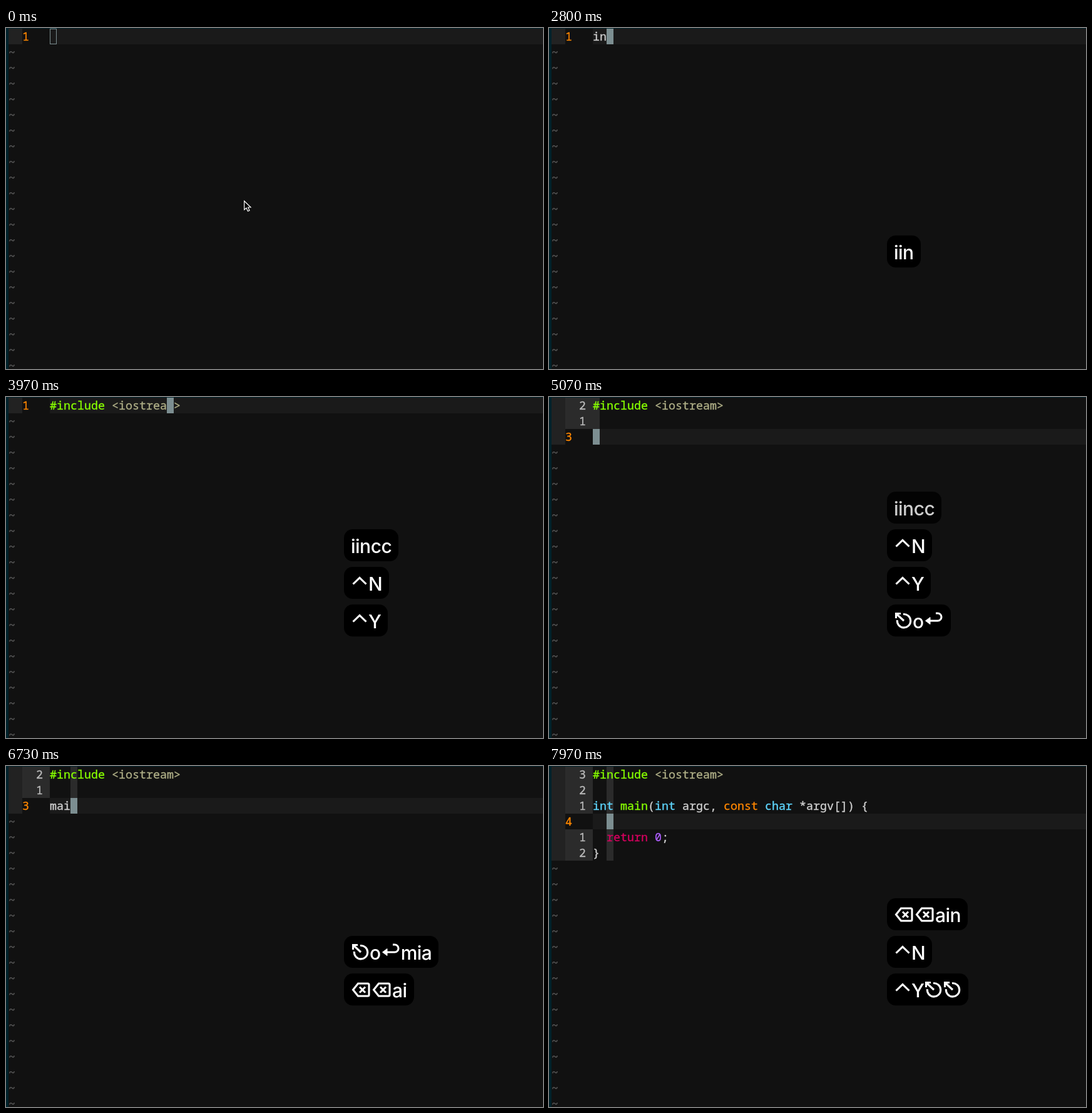
These frames come from a looping animation (858x544 px, 8000 ms). An HTML page:

```html
<!DOCTYPE html>
<html lang="en">
<head>
<meta charset="utf-8">
<title>Snippet completion in a terminal editor</title>
<style>
html, body { margin: 0; width: 100%; height: 100%; overflow: hidden; background: #111; }
#stage { position: absolute; inset: 0; overflow: hidden; background: #111; }
#stage::before { content: ""; position: absolute; inset: 0; border: solid #00222b; border-width: 1px 0 0 4px; }
#editor { position: absolute; left: 4px; top: 1px; right: 0; bottom: 0; overflow: hidden;
  font: 500 18.3333px/24px "Noto Sans Mono", monospace; color: #d0d0d0; white-space: pre;
  -webkit-text-stroke: .35px; }
#editor div { position: absolute; height: 25px; }
.sign { left: 0; width: 22px; background: #222; }
.number { left: 22px; width: 44px; background: #2b2b2b; color: #bcbcbc; }
.number.current { background: #111; color: #ff8700; }
.line { left: 66px; right: 0; }
.line.current { background: #1a1a1a; }
.column { width: 11px; background: #2b2b2b; }
.cursor { width: 11px; background: #7c8e91; }
.cursor.hollow { box-sizing: border-box; border: 1px solid #7c8e91; background: none; }
.tilde { left: 0; color: #585858; }
.menu { left: 55px; background: #000; color: #5fd7ff; }
.menu.selected { background: #6c6c6c; color: #eee; }
.green { color: #87ff00; } .sand { color: #afaf87; } .cyan { color: #5fd7ff; }
.orange { color: #ff8700; } .red { color: #d7005f; } .violet { color: #af5fff; }
.bubble { position: absolute; left: 540px; height: 51px; padding: 0 11px; border-radius: 14px; display: flex;
  background: #000; color: #fff; font: 500 30px/54px Inter, sans-serif; letter-spacing: -.5px; white-space: pre; }
.bubble svg { flex: none; fill: none; stroke: #fff; stroke-width: 3.1; }
.pointer { position: absolute; left: 0; top: 0; overflow: visible; fill: #000; stroke: #fff; stroke-width: 1.2; }
</style>
</head>
<body>
<div id="stage">
  <div id="editor"></div>
  <div id="keys"></div>
  <svg class="pointer" id="arrow" width="12" height="18"><path d="M.7 1V15L4 12L6.4 17.3L9 16.2L6.7 11H11Z"/></svg>
  <svg class="pointer" id="beam" width="9" height="18"><path d="M.7 1H3.4L4.5 2L5.6 1H8.3V3H6.2L5.5 4V8H6.5V10H5.5V14L6.2 15H8.3V17H5.6L4.5 16L3.4 17H.7V15H2.8L3.5 14V10H2.5V8H3.5V4L2.8 3H.7Z"/></svg>
</div>
<script>
const LOOP = 8000, CELL = 11, ROW = 25, ROWS = 22;
const $ = id => document.getElementById(id);
const escapeHtml = s => s.replace(/&/g, '&amp;').replace(/</g, '&lt;');
const span = (color, s) => `<span class="${color}">${escapeHtml(s)}</span>`;

const include = span('green', '#include') + ' ' + span('sand', '<iostream>');
const mainBody = [
  span('cyan', 'int') + ' ' + span('green', 'main') + '(' + span('cyan', 'int') + ' argc, ' +
    span('orange', 'const') + ' ' + span('cyan', 'char') + ' *argv[]) {',
  '',
  '  ' + span('red', 'return') + ' ' + span('violet', '0') + ';',
  '}'
];

// One editor view; `column` is the highlighted cursor column.
const view = (lines, row, col, extra) => ({ lines, row, col, column: col, ...extra });
const first = (s, extra) => view([s], 0, s.length, extra);
const third = (s, extra) => view([include, '', s], 2, s.length, extra);

const incMenu = 'incc~ S [S]', mainMenu = 'main~ S [S]';
const finished = view([include, '', ...mainBody], 3, 2);
const views = [
  [0, first('', { hollow: true })],
  [1000, first('')],
  [2600, first('i')],
  [2730, first('in')],
  [2870, first('inc')],
  [3030, first('incc')],
  [3100, first('incc', { menu: incMenu })],
  [3300, first('incc', { menu: incMenu, selected: true })],
  [3520, view([include], 0, 17)],
  [4600, view([include, ''], 1, 0)],
  [4800, third('')],
  [5170, third('m', { column: 0 })],
  [5300, third('mi', { column: 0 })],
  [5430, third('mia', { column: 0 })],
  [5530, third('mia', { column: 0, menu: 'PTHREAD_MUTEX_INITIALIZER r [LS]' })],
  [6130, third('mi')],
  [6270, third('m')],
  [6430, third('ma')],
  [6570, third('mai')],
  [6850, third('main', { column: 3 })],
  [6930, third('main', { column: 3, menu: mainMenu })],
  [7200, third('main', { column: 3, menu: mainMenu, selected: true })],
  [7400, finished]
];

// Each bubble: its keys and the time each was pressed.
const bubbles = [
  ['iincc', [2230, 2600, 2730, 2870, 3030]],
  ['⌃N', [3300, 3300]],
  ['⌃Y', [3520, 3520]],
  ['⎋o↩mia', [4430, 4600, 4800, 5170, 5300, 5430]],
  ['⌫⌫ain', [6130, 6270, 6430, 6570, 6850]],
  ['⌃N', [7200, 7200]],
  ['⌃Y⎋⎋', [7400, 7400, 7530, 7670]]
];
const HOLD = 2000, FADE = 200;

const icon = (width, path) => `<svg width="${width}" height="51">${path}</svg>`;
const icons = {
  '⌃': icon(28, '<path d="M3.5 27.5L14 17.5L24.5 27.5"/>'),
  '⎋': icon(30, '<path d="M15 15.5A10.7 10.7 0 1 1 5.4 25M16 26L4 15M3.5 22V14.5H11"/>'),
  '↩': icon(32, '<path d="M6 26H22A6 6 0 0 0 22 14H19"/><path d="M2.5 26L10 20.5V31.5Z" fill="#fff" stroke-width="1"/>'),
  '⌫': icon(33, '<path d="M3.5 26L11.5 16H27Q29 16 29 18V34Q29 36 27 36H11.5Z"/><path d="M14 21.5L23 30.5M23 21.5L14 30.5"/>')
};
const keyHtml = s => s.replace(/[⌃⎋↩⌫]|[a-zA-Z]+/g, k => icons[k] || `<span>${k}</span>`);

const box = (cls, row, html = '', col) =>
  `<div class="${cls}" style="top:${row * ROW}px${col === undefined ? '' : `;left:${66 + col * CELL}px`}">${html}</div>`;

function editorHtml(v) {
  let html = '';
  for (let r = 0; r < ROWS; r++) {
    if (r >= v.lines.length) { html += box('tilde', r, '~'); continue; }
    const current = r === v.row ? ' current' : '';
    const label = current ? String(r + 1) : `  ${Math.abs(r - v.row)} `;
    html += box('sign', r) + box('number' + current, r, label);
    if (!current) html += box('column', r, '', v.column);
    html += box('line' + current, r, v.lines[r]);
  }
  html += box('cursor' + (v.hollow ? ' hollow' : ''), v.row, '', v.col);
  if (v.menu) html += box('menu' + (v.selected ? ' selected' : ''), v.row + 1, ` ${v.menu} `.padEnd(16));
  return html;
}

function keysHtml(t) {
  const started = bubbles.filter(([, times]) => times[0] <= t);
  return started.map(([keys, times], i) => {
    const opacity = Math.min(1, 1 - (t - times[times.length - 1] - HOLD) / FADE);
    if (opacity <= 0) return '';
    const pressed = keys.slice(0, times.filter(x => x <= t).length);
    const top = 331 - 60 * (started.length - 1 - i);
    return `<div class="bubble" style="top:${top}px;opacity:${opacity}">${keyHtml(pressed)}</div>`;
  }).join('');
}

function movePointer(t) {
  const p = Math.min(1, Math.max(0, (t - 100) / 400));
  const e = p * p * (3 - 2 * p);
  $('arrow').style.transform = `translate(${380 - 60 * e}px, ${275 - 121 * e}px)`;
  $('arrow').style.display = t < 1000 ? '' : 'none';
  $('beam').style.transform = 'translate(316px, 147px)';
  $('beam').style.display = t >= 1000 && t < 2230 ? '' : 'none';
}

let shownView, shownKeys;
function draw(now) {
  const t = now % LOOP;
  const current = views.filter(([start]) => start <= t).pop()[1];
  if (current !== shownView) $('editor').innerHTML = editorHtml(shownView = current);
  const keys = keysHtml(t);
  if (keys !== shownKeys) $('keys').innerHTML = shownKeys = keys;
  movePointer(t);
}

const begin = performance.now();
function tick() {
  draw(performance.now() - begin);
  requestAnimationFrame(tick);
}
tick();
</script>
</body>
</html>
```
